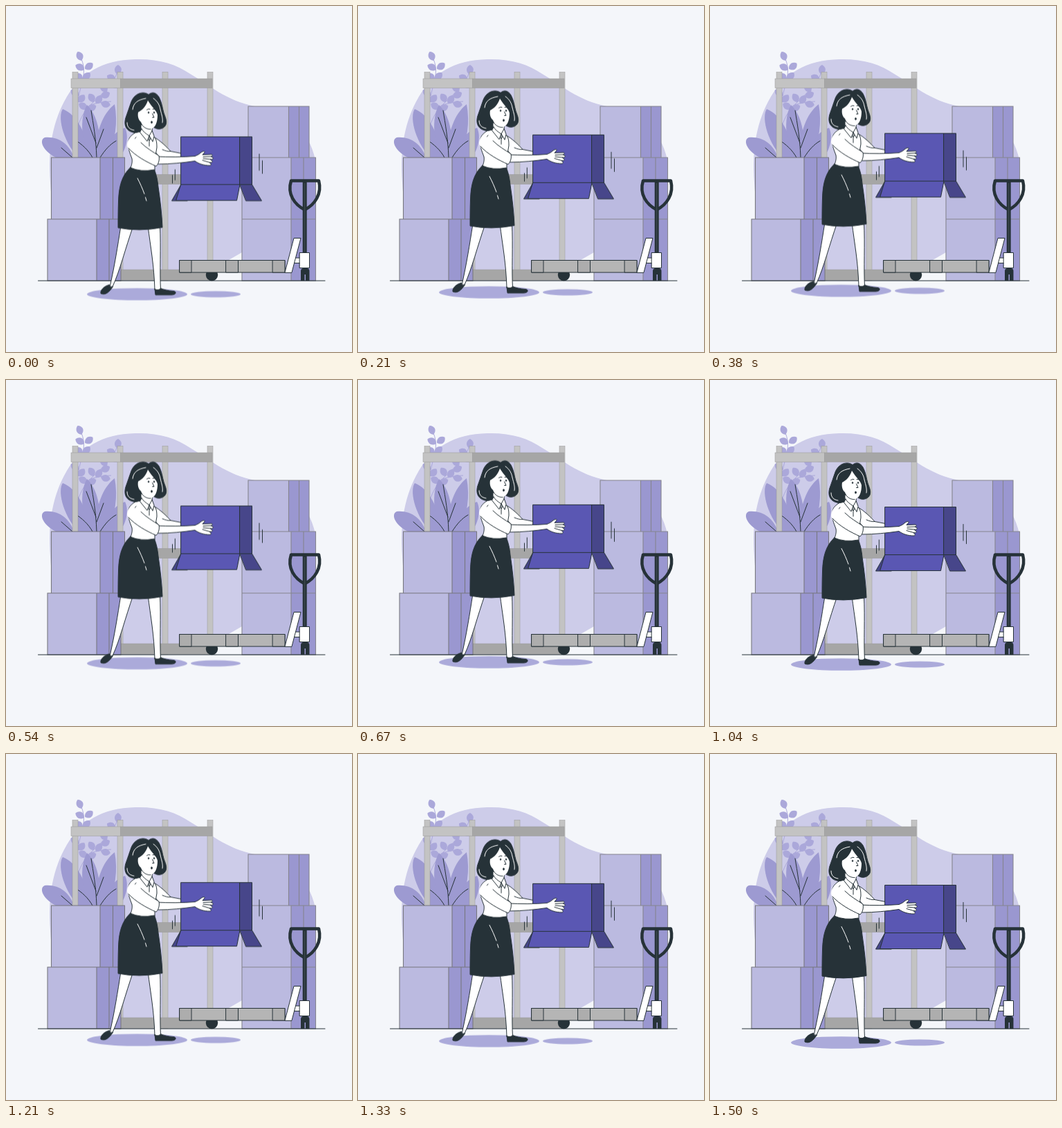
Recreate the animation shown at these times as an HTML page. Size 500 by 500 pixels, loop 1540 ms.

```html
<!DOCTYPE html>
<html lang="en">
<head>
<meta charset="utf-8">
<title>Lifting a box</title>
<style>
html, body { margin: 0; height: 100%; overflow: hidden; background: #f4f6fa; }
svg { display: block; width: 100vw; height: 100vh; }
.ink { stroke: #263238; fill: none; stroke-width: 1; stroke-linecap: round; stroke-linejoin: round; }
.skin { fill: #fff; }
.dark { fill: #263238; }
.light { stroke: #fff; }
.front { fill: #bbbae0; }
.side { fill: #9a97d0; }
.edge { stroke: #77777f; stroke-width: 1.1; fill: none; }
.right .edge { stroke: #85858f; }
.float { animation: float 1540ms linear -40ms infinite; }
@keyframes float { 50% { transform: translateY(-10px); } }
</style>
</head>
<body>
<svg viewBox="0 0 500 500" xmlns="http://www.w3.org/2000/svg">
<defs>
  <path id="leaf" d="M0 0C-7-3-7-10-2-14C5-12 7-5 0 0Z"/>
</defs>

<path id="blob" fill="#cdcce9" d="M64 255C60 205 68 165 88 131C108 98 138 78 187 77C220 76 246 84 266 98C292 113 318 137 360 145C408 152 438 180 447 222C455 275 405 325 341 356L322 367C290 386 255 397 215 397H100C80 350 66 300 64 255Z"/>

<g id="sprigs" fill="#aba8da">
  <g fill="none" stroke="#aba8da">
    <path d="M107 72C113 85 115 95 108 118C102 140 100 160 102 180"/>
    <path d="M162 91C158 112 138 127 122 143C112 153 106 165 102 180"/>
    <path d="M122 143C132 140 144 138 152 138"/>
  </g>
  <use href="#leaf" transform="translate(109 79) rotate(-15)"/>
  <use href="#leaf" transform="translate(113 92) rotate(-55)"/>
  <use href="#leaf" transform="translate(114 91) rotate(62)"/>
  <use href="#leaf" transform="translate(111 106) rotate(-52)"/>
  <use href="#leaf" transform="translate(111 106) rotate(55)"/>
  <use href="#leaf" transform="translate(105 130) rotate(-45)"/>
  <use href="#leaf" transform="translate(104 139) rotate(50)"/>
  <use href="#leaf" transform="translate(161 99) rotate(12)"/>
  <use href="#leaf" transform="translate(158 108) rotate(-50)"/>
  <use href="#leaf" transform="translate(153 117) rotate(70)"/>
  <use href="#leaf" transform="translate(146 124) rotate(-35)"/>
  <use href="#leaf" transform="translate(137 131) rotate(75)"/>
  <use href="#leaf" transform="translate(127 139) rotate(-22)"/>
  <use href="#leaf" transform="translate(130 141) rotate(40)"/>
  <use href="#leaf" transform="translate(137 140) rotate(110)"/>
  <use href="#leaf" transform="translate(117 149) rotate(-48)"/>
  <use href="#leaf" transform="translate(117 149) rotate(78)"/>
</g>

<g id="plant">
  <g fill="#9d9ad1">
    <path d="M98 219C92 200 76 188 56 190C48 193 51 208 72 219Z"/>
    <path d="M122 219C117 186 103 157 82 149C75 158 80 192 104 219Z"/>
    <path d="M122 219C106 190 108 158 117 143C131 156 139 184 134 219Z"/>
    <path d="M128 219C130 182 139 156 157 142C162 168 158 196 146 219Z"/>
    <path d="M138 219C146 196 158 180 172 176C178 188 174 207 164 219Z"/>
  </g>
  <path class="ink" d="M123 151C126 170 130 190 131 219M116 161L130 198M141 178L131 205M99 193C110 200 119 208 125 219M136 219C143 208 150 200 159 195M80 205L96 219"/>
</g>

<g id="rack" stroke="#999" stroke-width=".5">
  <g fill="#c3c3c3">
    <rect x="96" y="95.5" width="8" height="301"/>
    <rect x="161" y="95.5" width="8" height="301"/>
    <rect x="226" y="95.5" width="8" height="301"/>
    <rect x="291" y="95.5" width="8" height="301"/>
    <rect x="94" y="105" width="71.5" height="13.5"/>
  </g>
  <g fill="#a6a6a6">
    <rect x="165.5" y="105" width="132.5" height="13.5"/>
    <rect x="165.5" y="243.5" width="126" height="14"/>
    <rect x="165.5" y="381" width="126" height="15.5"/>
  </g>
</g>

<g id="left-stack">
  <path class="front" d="M65.500 219h71v89h-71zM60 308h71v89h-71z"/>
  <path class="side" d="M136 219h35.500v89H136zM131 308h35v89h-35z"/>
  <path class="edge" d="M65.500 219h106v89h-106zM136 219v89M154.500 219v89M60 308h106v89H60zM131 308v89M149 308v89"/>
</g>

<g class="right">
  <path class="front" d="M350 145h58v74h-58zM341 219h71v178h-71z"/>
  <path class="side" d="M408 145h30v74h-30zM412 219h35.500v178H412z"/>
  <path class="edge" d="M350 145h88v74h-88zM408.500 145v74M423.500 145v74M341 219h106.500v178H341zM341 308h106.500M412 219v178M430 219v178"/>
</g>

<path class="ink" d="M46.500 397H461"/>

<g id="truck">
  <circle class="dark" cx="297.5" cy="388.5" r="8.7"/>
  <path class="ink" style="fill:#b5b5b5" d="M251 367.500H403V385H251z"/>
  <path class="ink" style="fill:#adadad" d="M251 367.500h17V385h-17zM318 367.500h17.500V385H318zM385.500 367.500H403V385h-17.500z"/>
  <g fill="none" stroke="#263238" stroke-linejoin="round">
    <path stroke-width="6" d="M431.700 252V358"/>
    <path stroke-width="4.5" d="M412 252.500H452C457 272 446 287 431.700 294.500C417 287 406 272 412 252.500Z"/>
    <path stroke="#59656b" stroke-width=".6" d="M431.700 256V355"/>
  </g>
  <path class="ink skin" d="M417 364h9v7.500h-9z"/>
  <path class="ink skin" d="M403 385L416 335.500H426L413 385Z"/>
  <path class="ink skin" d="M424.500 356.500h14v22h-14z"/>
  <path class="dark" d="M426 397V383Q426 379 430 379H434.500Q438.500 379 438.500 383V397H433V388H431.500V397Z"/>
</g>

<g class="float">
  <g fill="#abaada">
    <ellipse cx="189.5" cy="417" rx="72.5" ry="8.8"/>
    <ellipse cx="303" cy="417" rx="36" ry="4.5"/>
  </g>

  <g id="legs" class="ink">
    <path class="skin" d="M166 318C161 350 157 375 151 402L150 406L154 406C165 382 172 352 184 318Z"/>
    <path class="skin" d="M205 318C209 350 214 375 215 411L223.500 411C222 385 224 350 222.500 318Z"/>
    <path class="dark" d="M149 403.500C142 405 136 411 137 416C144 419 149 414 154.500 406C152 408 150 407 149 403.500Z"/>
    <path class="dark" d="M215 409.500L216 418H239C246 418 247 413 242 412.500C234 412 228 410.500 223.500 408.500C221 411 218 411.500 215 409.500Z"/>
  </g>

  <g id="body" class="ink">
    <path class="skin" d="M214 190C223 195 232 204 238 210.500L256 214V219H222L212 207Z"/>
    <path d="M226 208C231 210 234 211 238 210.500"/>
    <path class="skin" d="M195 180C187 183 179 187 177 195C175 204 179 213 182 221C183 227 181 232 179 237Q198 243 215 238V222L218 205C218 196 217 192 213 189L207 184Z"/>
    <path class="dark" d="M179.500 234C167 246 163 262 162.500 283C162 297 162 309 162 321Q192 327 226 320.500C225 300 223 282 220 262C219 251 217 244 214.500 237Q195 241 179.500 234Z"/>
    <path class="light" d="M190 249.500C194 257 197 264 200 272M201.500 277L203 282"/>
  </g>

  <g id="head" class="ink">
    <path class="dark" d="M206 128.500C199 123 186 126 181 139C178 147 176 154 173 162C169 175 176 183 187 183.500C194 183 198 180 201 176H214C221 181 229 177 231 172C233 166 230 161 228 155C226 148 225 139 221 132C216 124 210 125 206 128.500Z"/>
    <path class="skin" d="M195 172V181C198 187 203 191 207 195C210 191 212 186 211 180L212 175Z"/>
    <path class="skin" stroke="none" d="M205 137C202 146 197 151 191 154C190 159 191 165 195 168C197 175 203 179 209 178.500C216 177 219 168 219 158C218 152 211 147 205 137Z"/>
    <path d="M195 170C198 176 204 179 209 178.500"/>
    <path class="light" d="M183 150C184 141 190 136 202 134M213 134C219 138 222 144 223 150C225 158 227 163 226 169M175 169C175 176 179 179 185 180"/>
    <path d="M203.500 150.500Q205.500 148.500 208 149.500M212 149.500Q214 148.500 216 150.500M211.500 156L214 161.500H211.500"/>
    <ellipse class="dark" cx="206" cy="154.500" rx=".7" ry="1.1"/>
    <ellipse class="dark" cx="214" cy="154.500" rx=".7" ry="1.1"/>
    <ellipse class="dark" cx="210.5" cy="168.500" rx="1" ry="1.4"/>
    <path class="skin" d="M196 178L193.500 183L204 196L207 188C202 185 198 182 196 178ZM211 181L207 188L212 196.500L214 189Z"/>
    <path d="M207 188V203M182 200C184 195 186 192 188 190"/>
  </g>

  <g id="box" class="ink">
    <path fill="#47468a" d="M253 258.500L239.500 282H262Z"/>
    <path fill="#5a57b3" d="M253 189.500H338V258.500H253zM253 258.500H338L333.500 281.500H246Z"/>
    <path fill="#47468a" d="M338 189.500H355.500V258.500H338zM338 258.500H355.500L369.500 282H347Z"/>
    <path d="M366 214.500V238M370.500 224V242.500M244.300 237V252M240.500 245V256.500"/>
  </g>

  <g id="arm" class="ink">
    <path class="skin" d="M216 218C235 219 255 219 273 217.500C277 216 280 214 282 212C285 210 288 210 287 212L284 215.500L296 215C299 215 299 217.500 296 218L299 219.500C300 221.500 298 222.500 295 222L298 224.500C299 226.500 297 227 294 226.500C297 229 297 231 294 231C287 231 279 229 273 224.500C256 227 238 229 220 229Z"/>
    <path d="M285 218.500L296 218M285 221L295 222M284 223.500L294 226.500"/>
    <path class="skin" stroke="none" d="M181 189C173 197 173 206 181 211C191 218 204 226 217 232C221 228 222 222 221 217C211 210 203 205 196 199Z"/>
    <path d="M177 206C187 217 203 226 217 232C221 228 222 222 221 217C212 211 203 206 195 198"/>
  </g>
</g>
</svg>
</body>
</html>
```
